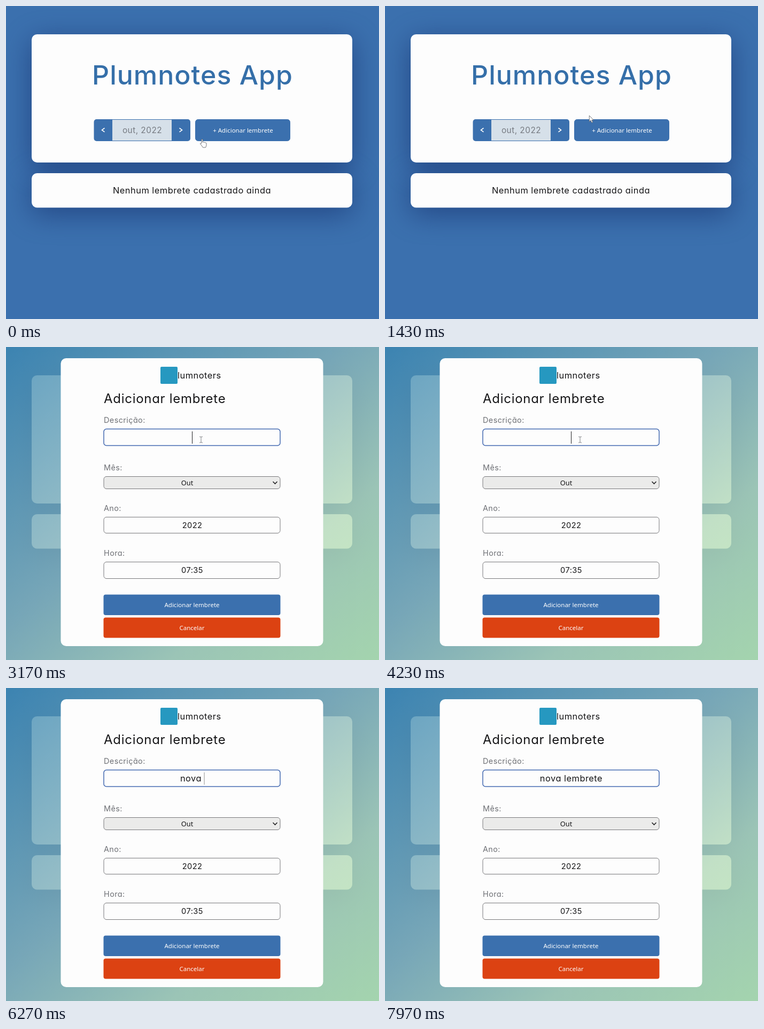
These frames come from a looping animation (698 px wide and 586 px high, 8000 ms). An HTML page:

```html
<!DOCTYPE html>
<html lang="pt">
<head>
<meta charset="utf-8">
<title>Lembretes</title>
<style>
  html, body { margin: 0; width: 100%; height: 100%; overflow: hidden; background: #3b70ae; }
  svg { display: block; width: 698px; height: 586px; }
  text { font: 16.4px Inter, sans-serif; font-feature-settings: "cv11"; letter-spacing: .03em; fill: #151517; white-space: pre; }
  .mid { text-anchor: middle; }
  .title { font-size: 50px; font-weight: 500; letter-spacing: .02em; fill: #356fa9; }
  .heading { font-size: 24px; }
  .label { font-size: 14.4px; fill: #6e7075; }
  .number { font-size: 14.6px; }
  .ui { font: 11.5px "Noto Sans", "Open Sans", sans-serif; letter-spacing: 0; fill: #fdfdfd; }
  .card { fill: #fdfdfd; }
  .blue { fill: #3b70ae; }
  .field { fill: #fdfdfd; stroke: #77777a; }
  .shadow { fill: #16316f; opacity: .65; filter: blur(27px); }
  .line { fill: none; stroke: #fdfdfd; stroke-width: 1.6; }
  .pointer { fill: #fdfdfd; stroke: #66686e; stroke-width: .9; stroke-linejoin: round; }
</style>
</head>
<body>
<svg viewBox="0 0 698 586">
  <defs>
    <linearGradient id="veil" x1="0" y1="0" x2="1" y2="1">
      <stop offset="0" stop-color="#3c88b2"/>
      <stop offset=".45" stop-color="#86b4ba"/>
      <stop offset=".72" stop-color="#b3d9b8"/>
      <stop offset="1" stop-color="#beedae"/>
    </linearGradient>
  </defs>

  <rect class="blue" width="698" height="586"/>
  <rect class="shadow" x="48" y="65" width="600" height="240" rx="10"/>
  <rect class="shadow" x="48" y="325" width="600" height="64" rx="10"/>
  <rect class="card" x="48" y="53" width="600" height="240" rx="10"/>
  <rect class="card" x="48" y="313" width="600" height="64.500" rx="10"/>
  <text class="title mid" x="349" y="147">Plumnotes App</text>

  <rect class="blue" x="164.500" y="212" width="180.500" height="41" rx="5"/>
  <rect x="199" y="213" width="111" height="39" fill="#d6e0e9"/>
  <path class="line" d="M184.500 228.500l-5 3.700 5 3.700M324.500 228.500l5 3.700-5 3.700"/>
  <text class="mid" x="255" y="238" style="font-size:15.400px;fill:#777b82">out, 2022</text>
  <rect id="addBox" x="354.500" y="212.500" width="177" height="40" rx="5"/>
  <text id="addText" class="ui mid" x="443.500" y="237">+ Adicionar lembrete</text>
  <text class="mid" x="348" y="351">Nenhum lembrete cadastrado ainda</text>

  <g id="modal">
    <rect width="698" height="586" fill="url(#veil)" opacity=".8"/>
    <rect class="card" x="102.500" y="21" width="491" height="539" rx="10"/>
    <rect x="289" y="37" width="32" height="32" rx="2" fill="#2698c0"/>
    <text x="321" y="59">lumnoters</text>
    <text class="heading" x="183" y="105">Adicionar lembrete</text>

    <text class="label" x="183" y="142">Descrição:</text>
    <rect class="field" x="183" y="153.500" width="330" height="31" rx="5" style="stroke:#4268b0;stroke-width:1.5"/>
    <text id="typed" class="mid" x="348.500" y="175"></text>
    <rect id="caret" y="158" width="1" height="23" fill="#202022"/>

    <text class="label" x="183" y="231">Mês:</text>
    <rect class="field" x="183" y="242.500" width="330" height="23" rx="5" style="fill:#ebebea"/>
    <text class="ui mid" x="339" y="259" style="font-size:12.800px;fill:#151517">Out</text>
    <path class="line" d="M499.500 252l4 4 4-4" style="stroke:#202022"/>

    <text class="label" x="183" y="307">Ano:</text>
    <rect class="field" x="183" y="318.500" width="330" height="30" rx="5"/>
    <text class="number mid" x="348.500" y="339">2022</text>

    <text class="label" x="183" y="391">Hora:</text>
    <rect class="field" x="183" y="402.500" width="330" height="31" rx="5"/>
    <text class="number mid" x="348.500" y="423">07:35</text>

    <rect class="blue" x="182.500" y="463.500" width="331" height="38.500" rx="4"/>
    <text class="ui mid" x="348" y="487">Adicionar lembrete</text>
    <rect x="182.500" y="506.500" width="331" height="38" rx="4" fill="#dc4212"/>
    <text class="ui mid" x="348" y="530">Cancelar</text>
  </g>

  <path id="arrow" class="pointer" d="M0 0v11.500l2.600-2.500 1.900 4.200 2-.9-1.900-4h3.400z"/>
  <path id="hand" class="pointer" d="M-1 8V1q1-2 2 0v5q2-1 2.200.4 2-.8 2.300.5 2-.4 2.500 1v4q-.5 2-1.500 4H1.500Q-1 12-3.500 9q0-2 2.500-1z"/>
  <path id="beam" class="line" d="M-3 0h2.300l.7 1 .7-1H3M0 1v9M-3 11h2.300l.7-1 .7 1H3" style="stroke:#808286;stroke-width:1"/>
</svg>
<script>
const el = id => document.getElementById(id);
const LOOP = 8000, OPEN = 2250, FADE = 250;
const TEXT = "nova lembrete";
const keyTime = i => i < 5 ? 5150 + i * 147.5 : 6350 + (i - 5) * 150;
const clamp = v => Math.max(0, Math.min(1, v));

// Each stop is [time, ...values]; eased between neighbours.
function track(stops, t) {
  const next = stops.findIndex(s => s[0] > t);
  if (next < 0) return stops[stops.length - 1].slice(1);
  if (next === 0) return stops[0].slice(1);
  const a = stops[next - 1], b = stops[next];
  const u = (t - a[0]) / (b[0] - a[0]), e = u * u * (3 - 2 * u);
  return a.slice(1).map((v, i) => v + (b[i + 1] - v) * e);
}

const pointerPath = [
  [0, 367, 249], [300, 376, 234], [600, 378, 222], [830, 372, 167],
  [1150, 373, 170], [1700, 391, 238], [2400, 391, 238], [2950, 365, 168]
];

const looks = {
  normal: { fill: [59, 112, 174], stroke: [59, 112, 174], text: [253, 253, 253] },
  hover: { fill: [253, 253, 253], stroke: [172, 178, 212], text: [92, 128, 178] },
  pressed: { fill: [211, 221, 219], stroke: [150, 172, 208], text: [118, 152, 200] }
};
const buttonStates = [
  [0, "normal"], [80, "normal"], [380, "hover"], [830, "hover"], [1130, "normal"],
  [1480, "normal"], [1780, "hover"], [1900, "hover"], [2020, "pressed"]
];
const buttonColor = (part, t) =>
  `rgb(${track(buttonStates.map(([time, name]) => [time, ...looks[name][part]]), t)})`;

function drawPointer(t) {
  const [x, y] = track(pointerPath, t);
  const overButton = x > 354 && y > 212 && y < 253;
  let shape = "arrow";
  if (t < 1950 && overButton) shape = "hand";
  if (t > OPEN + FADE && y < 185) shape = "beam";
  for (const id of ["arrow", "hand", "beam"]) {
    el(id).setAttribute("transform", `translate(${x} ${y})`);
    el(id).style.display = id === shape && t < keyTime(0) ? "" : "none";
  }
}

function drawInput(t) {
  let count = 0;
  while (count < TEXT.length && t >= keyTime(count)) count++;
  const typed = el("typed");
  typed.textContent = TEXT.slice(0, count);
  const width = count ? typed.getComputedTextLength() : 0;
  el("caret").setAttribute("x", 348 + width / 2);
  const phase = (t - (count ? keyTime(count - 1) : 1840)) % 1060;
  el("caret").style.opacity = clamp((560 - phase) / 60);
}

function draw(t) {
  el("addBox").setAttribute("fill", buttonColor("fill", t));
  el("addBox").setAttribute("stroke", buttonColor("stroke", t));
  el("addText").style.fill = buttonColor("text", t);
  el("modal").style.opacity = clamp((t - OPEN) / FADE);
  drawInput(t);
  drawPointer(t);
}

const start = performance.now();
function tick() {
  draw((performance.now() - start) % LOOP);
  requestAnimationFrame(tick);
}
tick();
</script>
</body>
</html>
```
